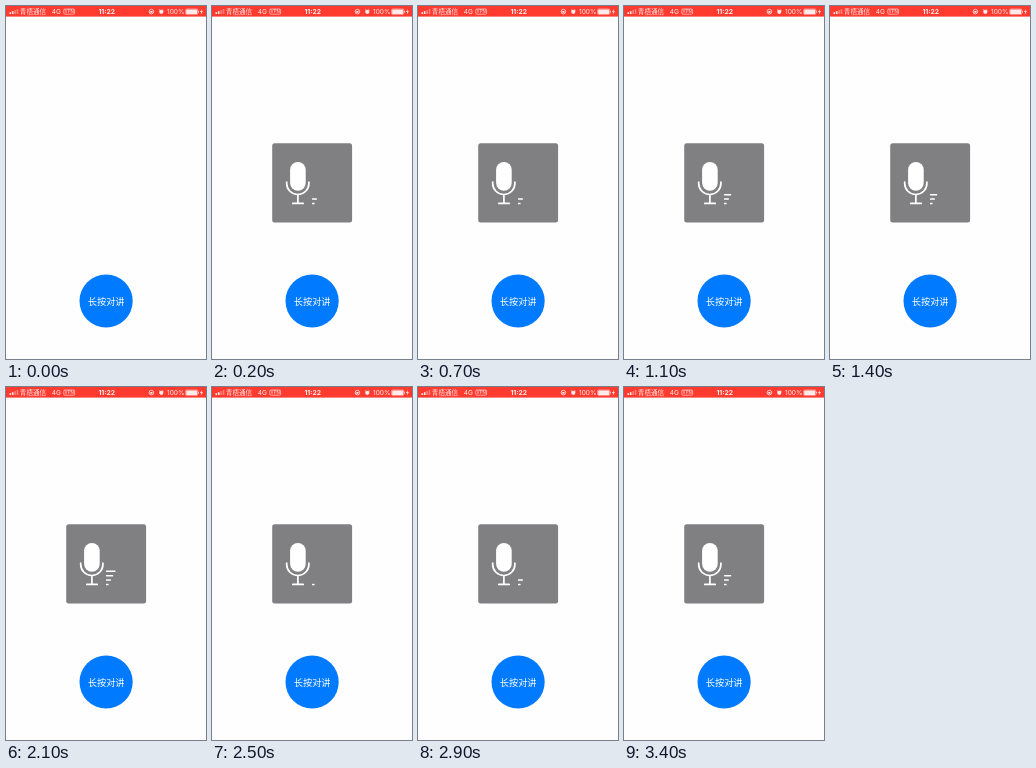
An HTML page that plays this animation: 200 by 353 pixels, repeating every 3500 ms.

```html
<!DOCTYPE html>
<html lang="zh-CN">
<head>
<meta charset="utf-8">
<title>长按对讲</title>
<style>
html, body { margin: 0; width: 100%; height: 100%; overflow: hidden; background: #fefefe; }
svg { display: block; width: 100%; height: 100%; }
text { font-family: "Noto Sans CJK SC", "Noto Sans CJK", "Noto Sans", sans-serif; fill: #fff; }
.status text { font-family: Inter, "Noto Sans CJK SC", "Noto Sans CJK", sans-serif; font-size: 6.6px; }
</style>
</head>
<body>
<svg viewBox="0 0 200 353">
  <filter id="soft" x="-10%" y="-10%" width="120%" height="120%" color-interpolation-filters="sRGB">
    <feGaussianBlur stdDeviation=".5"/>
  </filter>
  <rect width="200" height="353" fill="#fefefe"/>
  <rect width="200" height="10.6" fill="#ff3b30"/>
  <g class="status" fill="#fff" opacity=".9" filter="url(#soft)">
    <rect x="3.5" y="6.2" width="1.6" height="1.8"/>
    <rect x="5.9" y="5.2" width="1.6" height="2.8"/>
    <rect x="8.3" y="4.1" width="1.6" height="3.9" opacity=".4"/>
    <rect x="10.7" y="3" width="1.6" height="5" opacity=".4"/>
    <text x="13.8" y="8.1">青梧通信</text>
    <text x="45.8" y="8">4G</text>
    <rect x="57.8" y="3" width="10.8" height="5.2" rx="1" fill="none" stroke="#fff" stroke-width=".6"/>
    <text x="63.2" y="7.3" text-anchor="middle" style="font-size:4.4px">VPN</text>
    <text x="100.8" y="8.1" text-anchor="middle" style="font-size:6.8px;font-weight:700">11:22</text>
    <circle cx="145.4" cy="5.6" r="2.3" fill="none" stroke="#fff" stroke-width=".8"/>
    <rect x="144.3" y="5" width="2.2" height="1.7"/>
    <circle cx="155.3" cy="5.8" r="2.1"/>
    <path d="M153 4.3l1.2-1M157.6 4.3l-1.2-1" stroke="#fff" stroke-width=".7"/>
    <text x="161" y="8">100%</text>
    <rect x="179.6" y="3" width="12.2" height="5.4" rx="1" fill="none" stroke="#fff" stroke-width=".5"/>
    <rect x="180.2" y="3.5" width="11" height="4.4" rx=".5"/>
    <rect x="192.3" y="4.8" width=".7" height="1.8"/>
    <path d="M196.1 2.9l-2.2 3.1h1.4l-.6 2.5 2.3-3.2h-1.5z"/>
  </g>

  <g id="panel">
    <rect x="60.2" y="137.2" width="79.9" height="79.2" rx="2.5" fill="#808082"/>
    <rect x="78.1" y="156" width="15.6" height="28.8" rx="7.8" fill="#fff"/>
    <path d="M74.7 176.2v1.2a11.1 11.1 0 0 0 22.2 0V176.2M85.9 188.6v8.4M80.8 197.4h10.4"
      fill="none" stroke="#fff" stroke-width="1.7" stroke-linecap="round"/>
    <g id="bars" fill="#fff"></g>
  </g>

  <g filter="url(#soft)">
    <circle cx="100.1" cy="295" r="26.6" fill="#007aff"/>
    <text x="100.2" y="298.5" font-size="9.2" text-anchor="middle">长按对讲</text>
  </g>
</svg>
<script>
const LOOP = 3500, START = 200, BAR_COUNT = 5;
// [time in ms, number of lit bars]
const levels = [[200, 2], [1100, 3], [1700, 5], [2000, 4], [2200, 3],
                [2300, 2], [2500, 1], [2800, 2], [3100, 3]];

const panel = document.getElementById("panel");
const group = document.getElementById("bars");
const bars = Array.from({ length: BAR_COUNT }, (_, i) => {
  const bar = document.createElementNS("http://www.w3.org/2000/svg", "rect");
  const attrs = { x: 100, y: 196.8 - i * 4.45, width: 2.6 + i * 2.3, height: 1.5, rx: 0.4 };
  for (const key in attrs) bar.setAttribute(key, attrs[key]);
  return group.appendChild(bar);
});

function levelAt(t) {
  let level = 0;
  for (const [time, value] of levels) if (t >= time) level = value;
  return level;
}

function render(ms) {
  const t = ms % LOOP;
  const level = levelAt(t);
  panel.style.display = t < START ? "none" : "";
  bars.forEach((bar, i) => { bar.style.display = i < level ? "" : "none"; });
}

const begin = performance.now();
function tick() {
  render(performance.now() - begin);
  requestAnimationFrame(tick);
}
tick();
</script>
</body>
</html>
```
